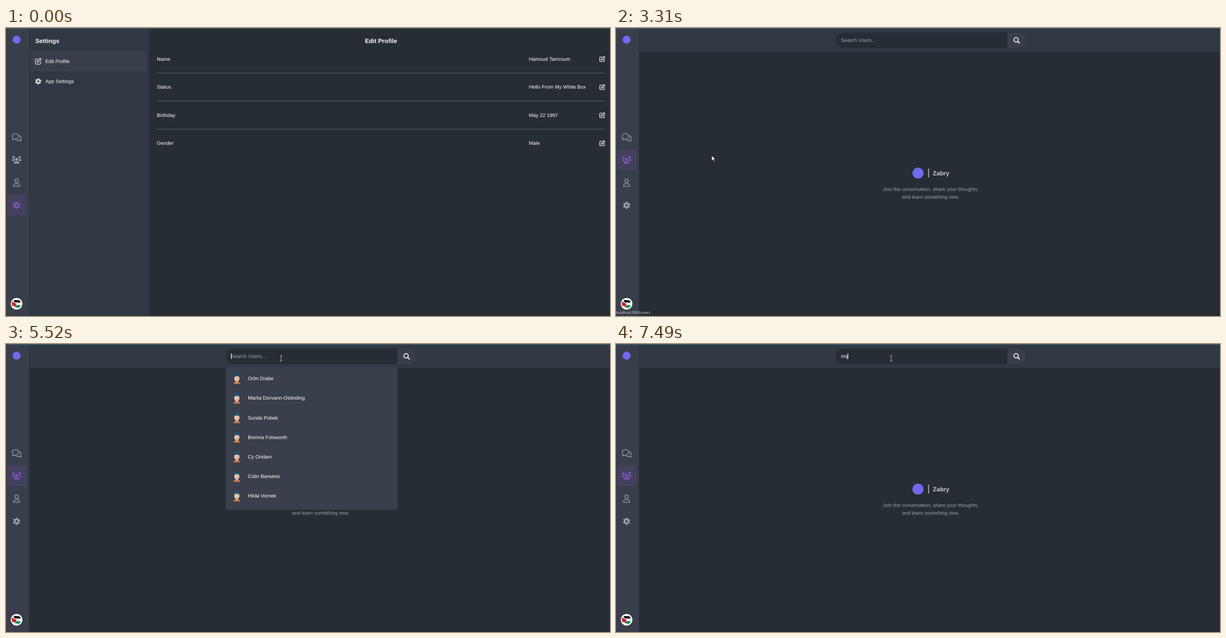
Animation of 1082x518 px, one loop 8 s. Source, as an HTML page:

```html
<!DOCTYPE html>
<html lang="en">
<head>
<meta charset="utf-8">
<title>Chat settings and user search</title>
<style>
  html, body { margin: 0; width: 100%; height: 100%; overflow: hidden; background: #262d34; }
  svg { display: block; width: 100%; height: 100%; }
  text { font: 9px "Liberation Sans", Arial, sans-serif; fill: #fff; text-rendering: geometricPrecision; white-space: pre; }
  .title { font-weight: bold; font-size: 10.9px; }
  .soft { fill: #9aa1a7; }
  .mid { text-anchor: middle; }
  .line { fill: none; stroke: currentColor; stroke-width: 1.25; stroke-linejoin: round; stroke-linecap: round; }
  .fill { fill: currentColor; }
</style>
</head>
<body>
<svg viewBox="0 0 1082 518">
  <defs>
    <g id="gear" fill="none" stroke="currentColor">
      <circle r="3.6" stroke-width="3"/>
      <circle r="5.6" stroke-width="2" stroke-dasharray="3 2.864" stroke-dashoffset="1.5" transform="rotate(30)"/>
    </g>
    <g id="chats" class="line">
      <path d="M-7.4 5Q-6.2 3.6-6.3 2.3A5.9 4.9 0 1 1-3.6 3.6Q-5.2 5-7.4 5Z"/>
      <path d="M4.6-2.4Q8.4-1.2 8.2 2Q8 3.6 6.9 4.6Q7 6 8.2 7.4Q6 7.4 4.6 6.2Q.4 7.2-1.8 4.6"/>
    </g>
    <g id="people" class="fill">
      <circle r="2.6" cy="-.9"/>
      <path d="M-5.2 6.8Q-5 2.7-2 2.7H2Q5 2.7 5.2 6.8Z"/>
      <circle r="2.1" cx="-5.4" cy="-4.6"/><circle r="2.1" cx="5.4" cy="-4.6"/>
      <path d="M-8.5 2Q-8.4-1.5-6-1.5H-4Q-3.9 .6-2.8 2ZM8.5 2Q8.4-1.5 6-1.5H4Q3.9 .6 2.8 2Z"/>
    </g>
    <g id="person" class="line">
      <circle r="3.1" cy="-3.6"/>
      <path d="M-5.6 6.5Q-5.4 1.8-1.6 1.8H1.6Q5.4 1.8 5.6 6.5Z"/>
    </g>
    <g id="edit" class="line">
      <path d="M-.5-4H-3.5Q-5-4-5-2.5V4Q-5 5.5-3.5 5.5H3Q4.5 5.5 4.5 4V1"/>
      <path d="M-2 2.6-1.5.2 3.6-5 5.6-3 .4 2.1Z"/>
    </g>
    <g id="face">
      <path d="M-6.2 20Q-6 16.4-2 16H2Q6-.2 2 16Q6 16.4 6.2 20Z" fill="#c9703f"/>
      <path d="M-2 13H2V17Q0 18.6-2 17Z" fill="#dba68a"/>
      <ellipse cy="10" rx="4.7" ry="5.6" fill="#f2c9b0"/>
      <path d="M-5.2 7.6Q-5.6 0 0 0Q5.6 0 5.2 7.6Q0 4.6-5.2 7.6Z" fill="#24506a"/>
      <path d="M-2.6 9.2h1.2M1.4 9.2h1.2M-1.4 13h2.8" stroke="#69463c" stroke-width=".8"/>
    </g>
    <clipPath id="disc"><circle r="10.3"/></clipPath>
  </defs>

  <rect width="1082" height="518" fill="#262d34"/>

  <g id="profile">
    <rect x="41" width="215.5" height="518" fill="#303841"/>
    <rect x="45" y="42" width="207" height="36" rx="2" fill="#383f4a"/>
    <text class="title" x="52.5" y="26.5">Settings</text>
    <g color="#d3d7db">
      <use href="#edit" x="57.5" y="59.5"/>
      <use href="#gear" transform="translate(57.8 96) scale(.87)"/>
    </g>
    <text x="70.5" y="63">Edit Profile</text>
    <text x="70.5" y="99.2">App Settings</text>
    <text class="title mid" x="671.7" y="26.5">Edit Profile</text>
    <g id="fields"></g>
  </g>

  <g id="users">
    <rect x="41" width="1041" height="43" fill="#303841"/>
    <path d="M701 8.5H407.5A13.75 13.75 0 0 0 407.5 36H701Z" fill="#262d34"/>
    <path d="M701 8.5H720A13.75 13.75 0 0 1 720 36H701Z" fill="#383f4a"/>
    <path d="M719.8 24.3L722.6 27.1" stroke="#fff" stroke-width="1.9" stroke-linecap="round"/>
    <circle cx="716.7" cy="21.2" r="3.9" fill="none" stroke="#fff" stroke-width="1.6"/>
    <text id="query" x="403" y="25"></text>
    <rect id="caret" y="17" width="1" height="10" fill="#fff"/>
    <circle cx="541" cy="261" r="10" fill="#7269ef"/>
    <rect x="559.4" y="253" width="1.2" height="16" fill="#d8dadc"/>
    <text class="title" x="567.5" y="265" style="fill:#c9cdd1">Zabry</text>
    <text class="mid soft" x="563.8" y="293.3">Join the conversation, share your thoughts,</text>
    <text class="mid soft" x="563.8" y="306.9">and learn something new.</text>
    <g id="list"></g>
  </g>

  <rect width="41" height="518" fill="#383f4a"/>
  <circle cx="19" cy="21" r="7.2" fill="#7269ef"/>
  <g id="nav"></g>

  <g transform="translate(19 496)">
    <circle r="10.5" fill="#fff"/>
    <g clip-path="url(#disc)">
      <path d="M-6-5Q-3-8 1-6.5Q5-7.5 7.5-3Q5-1.5 1-2.5Q-3-1-6-5Z" fill="#111"/>
      <path d="M-9-4L0 0L-3 6Q-5 3-8 4Z" fill="#d3202b"/>
      <path d="M-2 3Q2 1.5 7 3Q8 5 5 5.5L4 8Q1 5.5-2 7Z" fill="#16874a"/>
    </g>
  </g>
  <text id="status" x="0" y="514.3" style="font:6.4px 'Open Sans','Noto Sans',sans-serif;fill:#e4e6e8">localhost:3000/users</text>
  <g id="tip">
    <path d="M6.5 197H31.5Q34 197 34 199.5V213.5Q34 216 31.5 216H22L19 219L16 216H6.5Q4 216 4 213.5V199.5Q4 197 6.5 197Z"/>
    <text class="mid" x="19" y="209" style="font-size:6.9px">People</text>
  </g>
  <rect width="1082" height="1.3" fill="#486067"/>

  <circle id="press" r="6.8" fill="#99911a"/>
  <g id="cursor">
    <path id="arrow" d="M0 0V9.2L2.1 7.3L3.6 10.8L5.3 10.1L3.8 6.8H6.6Z" fill="#fff" stroke="#000" stroke-width=".6"/>
    <path id="hand" d="M-1.3 1.2Q0-.8 1.3 1.2V5Q2.6 4 3.4 5.4Q4.6 4.8 5.2 6.2Q6.4 6 6.4 7.5V10Q6 12 5 13.5H-.8Q-2.5 11-4 8.5Q-4 6.8-2.4 7.6L-1.3 8.8Z" fill="#fff" stroke="#000" stroke-width=".6"/>
    <path id="beam" d="M-1.8-4.7H1.8M0-4.7V4.7M-1.8 4.7H1.8" fill="none" stroke="#c8cacc" stroke-width=".9"/>
  </g>
</svg>
<script>
const $ = id => document.getElementById(id);
const show = (id, on) => $(id).style.display = on ? '' : 'none';
const between = (t, a, b) => t >= a && t < b;
const ramp = (t, start, length) => Math.min(1, Math.max(0, (t - start) / length));

const LOOP = 8000;
const fields = [['Name', 'Hamoud Tamroum'], ['Status', 'Hello From My White Box'],
  ['Birthday', 'May 22 1997'], ['Gender', 'Male']];
const names = ['Orlin Drabe', 'Marlia Dorvann-Ostinding', 'Sunda Pobek', 'Brenna Folsworth',
  'Cy Ondam', 'Colin Barwess', 'Hilda Vornek', 'Glenn Tavisk', 'Lynnet Garrowby'];
const icons = [['chats', 196], ['people', 237], ['person', 278], ['gear', 319]];

// Cursor tip: time, x, y
const path = [[310, 800, 522], [360, 766, 508], [460, 500, 472], [560, 269, 442], [800, 269, 442],
  [960, 110, 345], [1110, 5.5, 255], [1260, 9, 247], [1460, 14, 241.5], [3200, 14, 241.5],
  [3260, 80, 236], [3410, 354, 216], [3550, 354, 216], [3710, 430, 110], [3910, 493, 26], [LOOP, 493, 26]];

$('fields').innerHTML = fields.map(([label, value], i) => {
  const y = 55.5 + 50.5 * i;
  return `<text x="270.3" y="${y + 3.2}">${label}</text><text x="936.8" y="${y + 3.2}">${value}</text>
    <use href="#edit" transform="translate(1068 ${y}) scale(.87)" color="#fff" stroke-width="1.6"/>` +
    (i < 3 ? `<rect x="270" y="${y + 25}" width="803" height="1" fill="#596066"/>` : '');
}).join('');

$('nav').innerHTML = icons.map(([id, y]) =>
  `<g id="nav-${id}"><rect x="2" y="${y - 18}" width="34.5" height="36" rx="3" fill="#44415f"/>
   <use href="#${id}" x="19" y="${y}"/></g>`).join('');

function setActive(id, amount) {
  const item = $('nav-' + id);
  item.style.color = `color-mix(in srgb, #7c54b9 ${amount * 100}%, #979fa8)`;
  item.firstChild.style.opacity = amount;
}

function cursorAt(t) {
  const step = Math.floor((t - 10) / 50) * 50 + 10;
  const i = Math.max(1, path.findIndex(p => p[0] > step));
  const [a, b] = [path[i - 1], path[i]];
  const k = ramp(step, a[0], b[0] - a[0]);
  return [a[1] + (b[1] - a[1]) * k, a[2] + (b[2] - a[2]) * k];
}

let listKey;
function drawList(open, filter, faces) {
  const key = [open, filter, faces].join();
  if (key === listKey) return;
  listKey = key;
  const rows = open ? names.filter(n => n.includes(filter)).slice(0, 7) : [];
  const height = rows.length === 7 ? 257.5 : 35.2 * rows.length + 8.5;
  $('list').innerHTML = !open ? '' :
    `<rect x="393.7" y="40.7" width="307.3" height="${height}" fill="#393f4b"/>` +
    rows.map((name, i) => {
      const y = 62 + 35.2 * i;
      return (faces ? `<use href="#face" x="413.5" y="${y - 10}"/>` : '') +
        `<text x="433.3" y="${y + 3.2}">${name}</text>`;
    }).join('');
}

function draw(t) {
  const onUsers = t >= 2680;
  show('profile', !onUsers);
  show('users', onUsers);

  setActive('chats', 0);
  setActive('people', ramp(t, 1160, 150));
  setActive('person', 0.12 * ramp(t, 960, 60) * (1 - ramp(t, 1150, 150)));
  setActive('gear', onUsers ? 0 : 1);

  $('tip').style.opacity = ramp(t, 1260, 150) * (1 - ramp(t, 3210, 100));
  $('status').style.opacity = ramp(t, 1590, 130) * (1 - ramp(t, 3600, 150));

  const typed = t < 6600 ? '' : t < 7140 ? 'n' : t < 7490 ? 'nn' : 'nnj';
  const query = $('query');
  query.textContent = typed || 'Search Users...';
  query.style.fill = typed ? '#fff' : '#a0a8ae';
  show('caret', between(t, 4460, 5030) || between(t, 5520, 6100) || t >= 6600);
  $('caret').setAttribute('x', 403 + [0, 5, 10, 12][typed.length]);
  drawList(between(t, 4510, 7490), t < 6600 ? '' : t < 7190 ? 'n' : 'nn', t >= 4830);

  const [x, y] = cursorAt(t);
  const overInput = onUsers && y < 36 && x > 394;
  const overLink = between(t, 1160, 3260);
  show('cursor', t >= 360);
  show('arrow', !overInput && !overLink);
  show('hand', overLink);
  show('beam', overInput);
  $('cursor').setAttribute('transform', `translate(${x} ${y})`);

  show('press', between(t, 2530, 2680) || between(t, 4460, 4610));
  $('press').setAttribute('transform', onUsers ? 'translate(491.3 25)' : 'translate(14.3 242)');
}

function frame() {
  draw(performance.now() % LOOP);
  requestAnimationFrame(frame);
}
frame();
</script>
</body>
</html>
```
